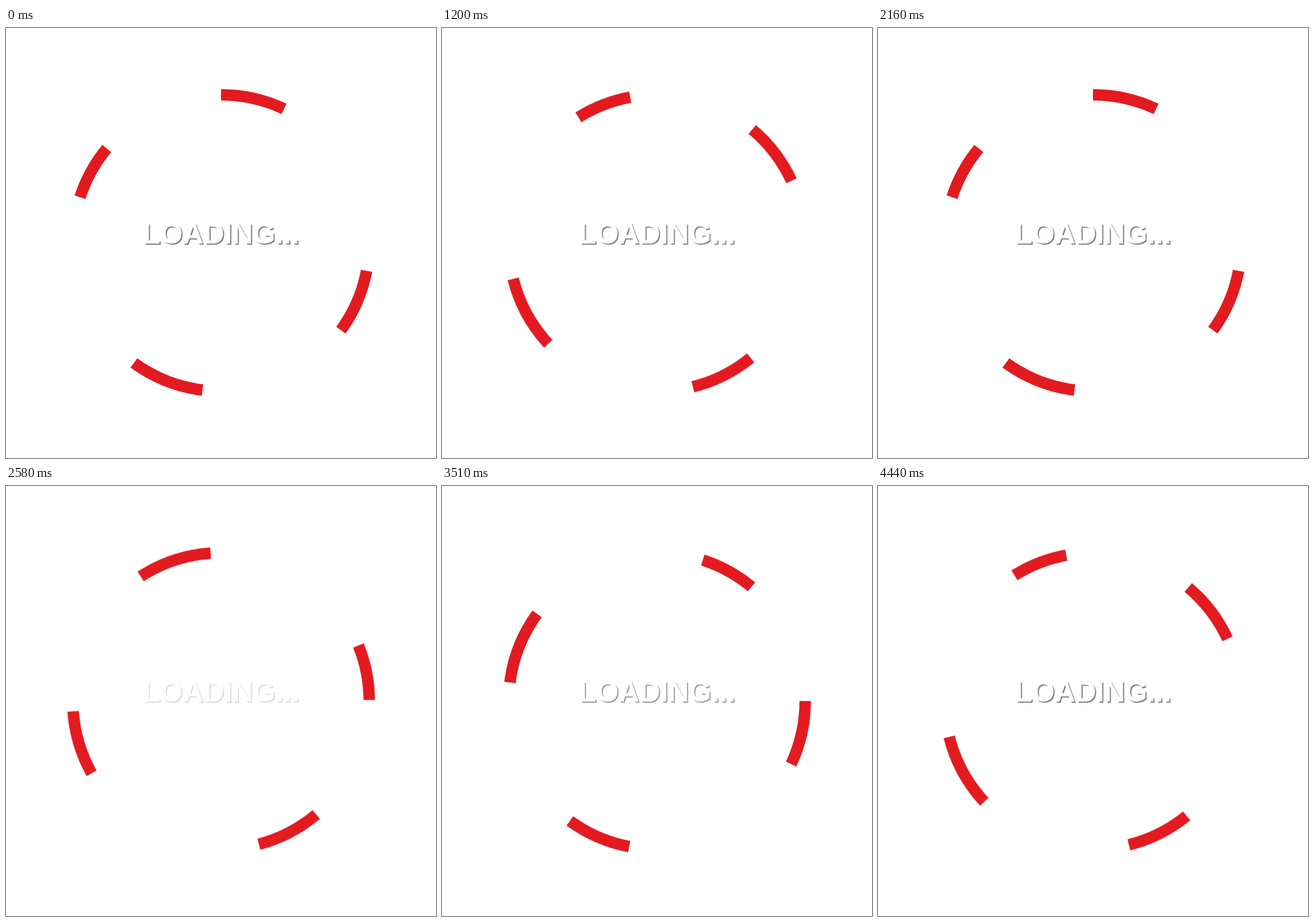
Recreate the animation shown at these times as an HTML page. Size 748 by 748 pixels, loop 4470 ms.

```html
<!DOCTYPE html>
<html lang="en">
<head>
<meta charset="utf-8">
<title>Loading</title>
<style>
  html, body { margin: 0; width: 100%; height: 100%; overflow: hidden; background: #fff; }
  svg { display: block; width: 100vw; height: 100vh; }

  /* pathLength 100: dash, gap, dash, gap ... clockwise from the top */
  .ring {
    fill: none;
    stroke: #e31b21;
    stroke-width: 20;
    stroke-dasharray: 7 21 7 17 8 20 6 14;
    transform-origin: 374px 374px;
    animation: spin 4470ms steps(149) infinite;
  }

  .label {
    font: bold 50px "Liberation Sans", Arial, sans-serif;
    text-anchor: middle;
    fill: #fff;
    text-shadow: 2px 2px 0 #808080;
    animation: pulse 4470ms cubic-bezier(.37, 0, .63, 1) infinite;
  }

  @keyframes spin { to { transform: rotate(1490deg); } }

  /* four pulses of 1110 ms, then a restart */
  @keyframes pulse {
    0%, 24.832%, 49.664%, 74.497%, 99.329%, 100% { opacity: 1; }
    12.416%, 37.248%, 62.081%, 86.913% { opacity: 0; }
  }
</style>
</head>
<body>
<svg viewBox="0 0 748 748">
  <path class="ring" pathLength="100"
        d="M374 116.2A257.8 257.8 0 0 1 374 631.8A257.8 257.8 0 0 1 374 116.2"/>
  <text class="label" x="374" y="375">LOADING...</text>
</svg>
</body>
</html>
```
